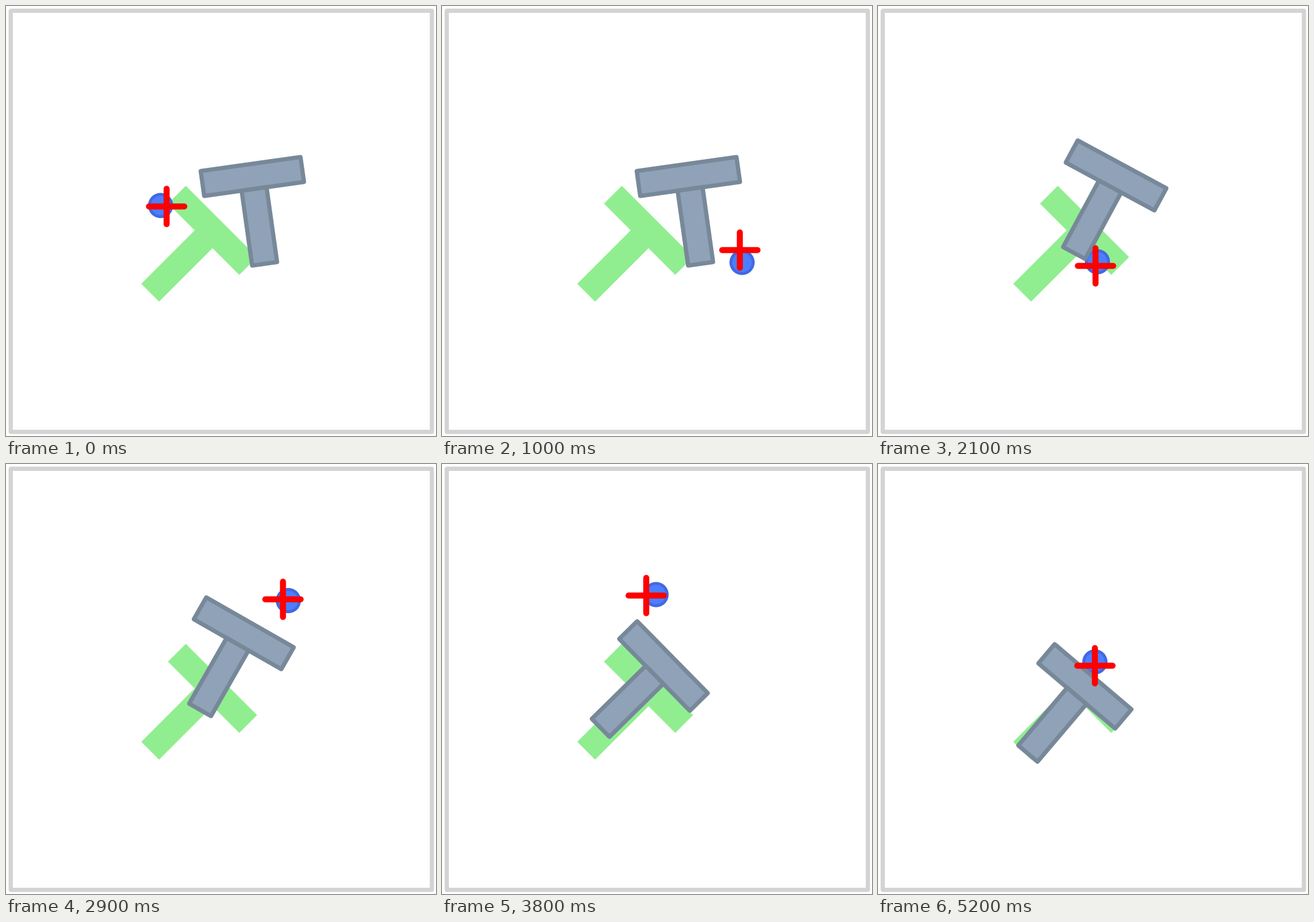
Write a matplotlib script that moves like this. It is 680x680 px and loops after 5.3 s.

```python
import numpy as np
import matplotlib.pyplot as plt
from matplotlib.animation import FuncAnimation
from matplotlib.patches import Circle, Polygon, Rectangle

SIZE, DPI, FRAMES, STEP_MS = 680, 100, 53, 100
SCALE = SIZE / 512      # the world is 512 units wide
PX = 72 / DPI           # one pixel in points
LINE = 5 * SCALE * PX
ARM = 21 * SCALE        # half a cross
LAG = 1.5               # steps the agent trails behind the cross

WALL = "#d3d3d3"
GOAL = "#90ee90"
BLOCK, BLOCK_FILL = "#778899", "#8fa2b7"
AGENT, AGENT_FILL = "#4169e1", "#4e7eff"

# Turning points of the drive: step, agent x, y, lead of the cross x, y
DRIVE = np.array([
    (0, 244, 315, 9.5, 1.5), (3, 318, 428, 63, 63), (6, 414, 492, 27, -12),
    (10, 474, 405, -3.5, -19.5), (13, 442, 371, -22, 5),
    (21, 346.5, 404, -3, 6.5), (24, 434, 418, 60, -14),
    (29, 446, 215.5, -8.5, -2), (33, 418, 293, -13, 33),
    (35, 402, 300, -16, -42), (38, 338, 206, -15.5, 1.5),
    (42, 288, 248, 12, 12), (45, 305.5, 208.5, 11, -26),
    (48, 341, 242, 12, 38), (52, 342.5, 312.5, 0, 6)])

# Resting pose of the block, then each push: start, end, new pose (x, y, degrees)
REST = (386.3, 249.4, -8)
PUSHES = [(12.8, 22.9, (385.4, 249.9, 29.7)),
          (31.4, 35.2, (364, 305, 45.5)),
          (41.4, 43.4, (374, 316.5, 50.5)),
          (48, 52, (339.6, 335.9, 40.3))]


def drive(t):
    """Agent on a Hermite curve; the cross leads it along its velocity."""
    times, pos, vel = DRIVE[:, 0], DRIVE[:, 1:3], DRIVE[:, 3:] / LAG
    i = min(np.searchsorted(times, t, side="right") - 1, len(times) - 2)
    h = times[i + 1] - times[i]
    u = (t - times[i]) / h
    move, v0, v1 = pos[i + 1] - pos[i], vel[i] * h, vel[i + 1] * h
    a, b = v0 + v1 - 2 * move, 3 * move - 2 * v0 - v1
    agent = pos[i] + u * (v0 + u * (b + u * a))
    speed = (v0 + u * (2 * b + u * 3 * a)) / h
    return agent, agent + LAG * speed


def block_pose(t):
    pose = np.array(REST)
    for start, end, goal in PUSHES:
        u = np.clip((t - start) / (end - start), 0, 1)
        pose = pose + (np.array(goal) - pose) * u * (2 - u)
    return pose


def box(x0, y0, x1, y1):
    return np.array([(x0, y0), (x1, y0), (x1, y1), (x0, y1)]) * 30 * SCALE


def place(shape, x, y, angle):
    a = np.radians(angle)
    c, s = np.cos(a), np.sin(a)
    return shape @ np.array([(c, s), (-s, c)]) + (x, y)


# Local origin of the T: middle of its top edge
BAR, STEM = box(-2, 0, 2, 1), box(-0.5, 1, 0.5, 4)

fig = plt.figure(figsize=(SIZE / DPI, SIZE / DPI), dpi=DPI, facecolor="white")
ax = fig.add_axes([0, 0, 1, 1])
ax.set_xlim(-0.5, SIZE - 0.5)  # whole numbers are pixel centres
ax.set_ylim(SIZE - 0.5, -0.5)
ax.axis("off")

for part in (BAR, box(-0.5, 0.5, 0.5, 4)):
    ax.add_patch(Polygon(place(part, 340.2, 340.2, 45), fc=GOAL, ec="none",
                         zorder=1))
ax.add_patch(Rectangle((6.8, 6.8), 501 * SCALE, 501 * SCALE, fill=False,
                       ec=WALL, lw=LINE, joinstyle="round", zorder=2))

discs = [ax.add_patch(Circle((0, 0), r, fc=color, ec="none", zorder=3))
         for r, color in ((15 * SCALE, AGENT), (11.5 * SCALE, AGENT_FILL))]
block = [ax.add_patch(Polygon(part, fc=BLOCK_FILL, ec=BLOCK, lw=LINE,
                              joinstyle="round", zorder=4))
         for part in (BAR, STEM)]
arms = [ax.plot([], [], color="red", lw=9.5 * PX, solid_capstyle="round",
                zorder=5)[0] for _ in range(2)]


def draw(step):
    agent, (x, y) = drive(step)
    for disc in discs:
        disc.center = agent
    pose = block_pose(step)
    for patch, part in zip(block, (BAR, STEM)):
        patch.set_xy(place(part, *pose))
    arms[0].set_data([x - ARM, x + ARM], [y, y])
    arms[1].set_data([x, x], [y - ARM, y + ARM])
    return discs + block + arms


anim = FuncAnimation(fig, draw, frames=FRAMES, interval=STEP_MS,
                     repeat=True, repeat_delay=0)
plt.show()
```
